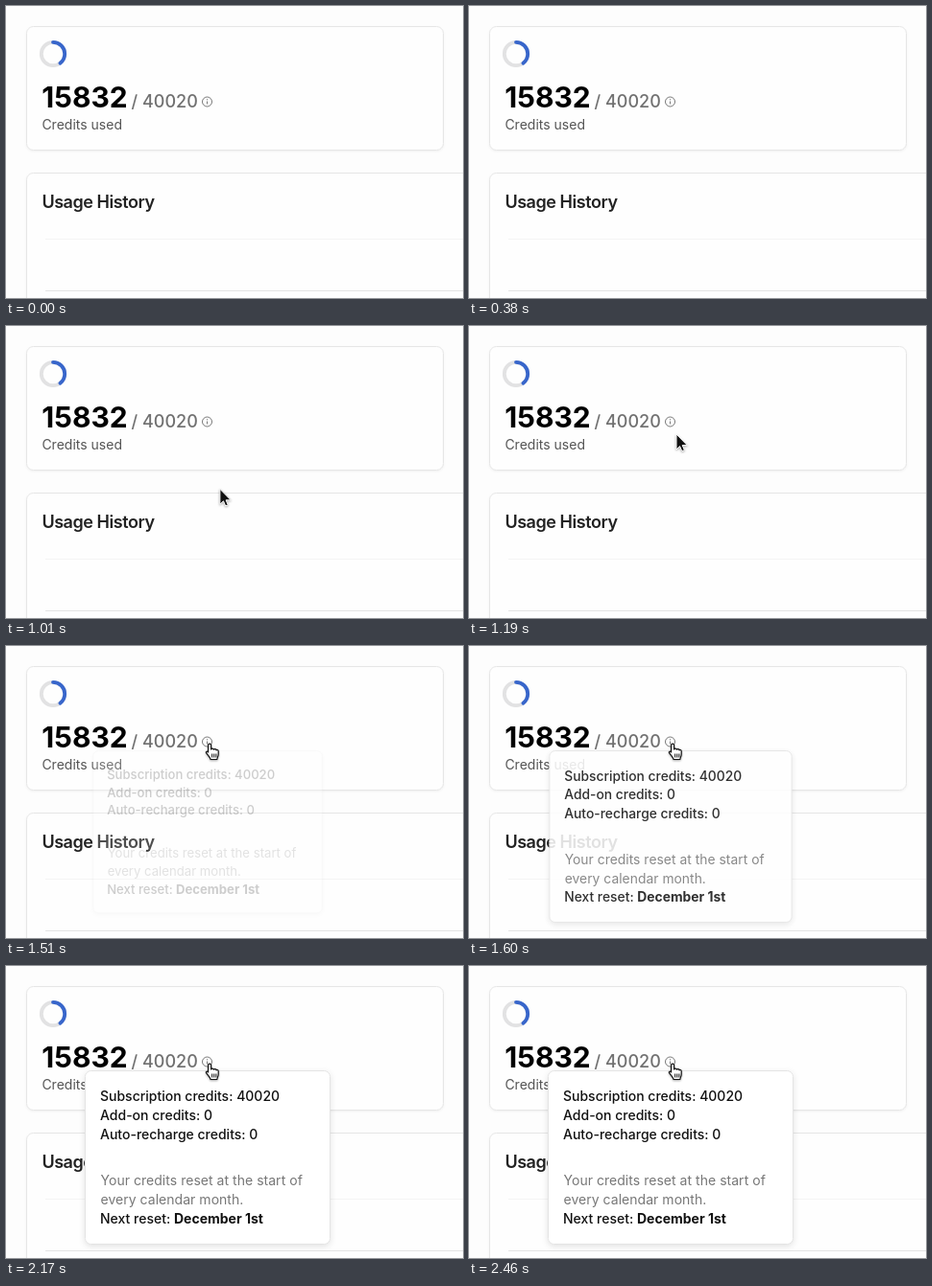
Write an HTML page that moves like this. It is 476 px wide and 305 px high and loops after 2860 ms.

```html
<!DOCTYPE html>
<html lang="en">
<head>
<meta charset="utf-8">
<title>Credits used</title>
<style>
  html, body { margin: 0; width: 100%; height: 100%; overflow: hidden; background: #fdfdfd; }
  svg { display: block; width: 476px; height: 305px; font: 14px Inter, sans-serif; }
  .panel { fill: #fefefe; stroke: #e6e6e6; filter: drop-shadow(0 1px 1px #0000000d); }
  .strong { font-weight: 700; }
  #tip { transform-origin: 210px 109.5px; font-weight: 500; fill: #111; }
  #tip rect { fill: #fff; stroke: #e4e4e4; filter: drop-shadow(0 2px 3px #0000001c); }
  #tip .note { font-weight: 400; fill: #777; letter-spacing: .03px; }
  #arrow, #hand { filter: drop-shadow(0 1px 1px #0005); }
</style>
</head>
<body>
<svg viewBox="0 0 476 305">
  <rect class="panel" x="21.5" y="21.5" width="434" height="129" rx="7"/>
  <rect class="panel" x="21.5" y="174.5" width="480" height="160" rx="7"/>
  <path d="M41 243.5H476" stroke="#f4f4f4"/>
  <path d="M41 297.5H476" stroke="#e4e4e4"/>

  <g fill="none" stroke-width="3.8">
    <circle cx="49" cy="50" r="12.2" stroke="#e2e2e3"/>
    <circle cx="49" cy="50" r="12.2" stroke="#3866cb" stroke-linecap="round"
      pathLength="100" stroke-dasharray="39.6 100" transform="rotate(-90 49 50)"/>
  </g>

  <text class="strong" x="37.3" y="106" font-size="30">15832</text>
  <g fill="#717171" font-size="18" font-weight="500">
    <text x="130.6" y="106">/</text>
    <text x="142" y="106">40020</text>
  </g>
  <g fill="none" stroke="#777">
    <circle cx="209.5" cy="100" r="5"/>
    <path d="M209.5 97.2v1.1M209.5 99.5v3"/>
  </g>
  <text x="37.4" y="129" fill="#555">Credits used</text>
  <text x="37.4" y="211" font-size="18" font-weight="600" letter-spacing="-.45" fill="#222">Usage History</text>

  <g id="tip">
    <rect x="82.5" y="109.5" width="255" height="181" rx="6"/>
    <text x="98" y="141">Subscription credits: 40020</text>
    <text x="98" y="161">Add-on credits: 0</text>
    <text x="98" y="181">Auto-recharge credits: 0</text>
    <text x="98.5" y="229" class="note">Your credits reset at the start of</text>
    <text x="98.5" y="249" class="note">every calendar month.</text>
    <text x="98" y="269">Next reset: <tspan class="strong">December 1st</tspan></text>
  </g>

  <path id="arrow" d="M0 0V16l3.6-3.4 2.2 5.1 2.6-1.1-2.2-5H11.3z" fill="#111" stroke="#fff"/>
  <g id="hand" transform="translate(207.4 101)" stroke="#111" stroke-width="1.2" stroke-linejoin="round">
    <path fill="#fff" d="M3.2 9.5V2.6a1.5 1.5 0 0 1 3 0V7c.3-1.2 2.6-1.2 2.8.2c.5-1 2.5-.8 2.6.6c.6-.8 2.2-.4 2.2 1v3.2c0 2.2-1 3-1.4 5.5H5.8c-.5-2-3-4.5-4.6-6.8c-.8-1.4.9-2.4 2-.8z"/>
    <path d="M7.3 11.5v4M9.4 11.5v4M11.5 11.5v4" stroke-width="1"/>
  </g>
</svg>
<script>
  const LOOP = 2860, ENTER = 610, HOVER = 1310, FADE = 1470;
  // The screen updates only at these moments.
  const ticks = [0, 610, 710, 790, 900, 1000, 1090, 1190, 1310, 1410, 1500, 1600, 1740];
  const [tip, arrow, hand] = ['tip', 'arrow', 'hand'].map(id => document.getElementById(id));
  const clamp = v => Math.min(1, Math.max(0, v));
  const show = (el, on) => { el.style.display = on ? '' : 'none'; };

  function draw(now) {
    const time = now % LOOP;
    const t = ticks.findLast(tick => tick <= time);

    const u = clamp((t - ENTER) / 580);
    const x = 240 - 24 * u ** 0.85, y = 281 - 168 * u ** 1.05;
    arrow.setAttribute('transform', `translate(${x} ${y})`);
    show(arrow, t >= ENTER && t < HOVER);
    show(hand, t >= HOVER);

    const p = clamp((t - FADE) / 150);
    tip.style.opacity = p;
    tip.style.transform = `scale(${0.92 + 0.08 * p})`;
  }

  const start = performance.now();
  function loop() {
    draw(performance.now() - start);
    requestAnimationFrame(loop);
  }
  loop();
</script>
</body>
</html>
```
